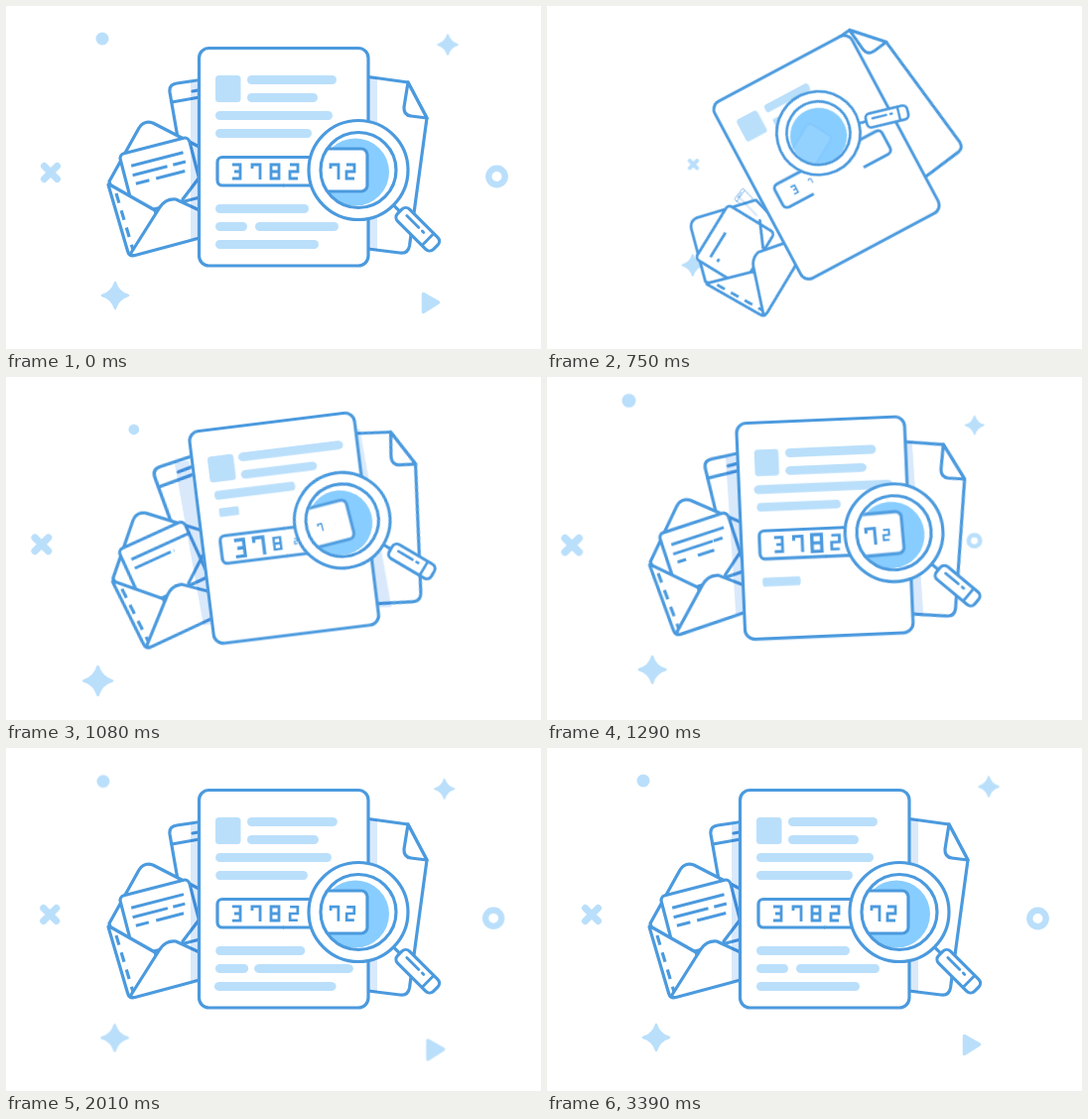
Write an HTML page without scripts that moves like this. It is 539x346 px and loops after 3.51 s.

```html
<!DOCTYPE html>
<html lang="en">
<head>
<meta charset="utf-8">
<title>Document search</title>
<style>
  @property --size { syntax: "<number>"; inherits: false; initial-value: 1; }

  html, body { margin: 0; width: 100%; height: 100%; overflow: hidden; background: #fff; }
  svg { display: block; width: 100%; height: 100%; }

  .line { fill: #fff; stroke: #4b9ade; stroke-width: 3.2; stroke-linejoin: round; stroke-linecap: round; }
  .open { fill: none; }
  .ink { fill: #4b9ade; }
  .pale { fill: #badffb; }
  .shade { fill: #d9e9fb; mix-blend-mode: multiply; }

  .spin, .side, .tab, .icon, .bar, .block, .digit, .early, .late, .field, .zoom {
    animation: 3.51s linear var(--d, 0s) infinite;
  }
  .spin { animation-name: spin; transform-origin: 282px 149px; }
  .lens { --d: .015s; transform-origin: 225px 258px; }
  .side { animation-name: side; }
  .page { --swing: 1.04; transform-origin: 279px 208px; }
  .envelope { --swing: .96; transform-origin: 214px 229px; }
  .tab { animation-name: tab; transform-origin: 200px 146px; }
  .icon { animation-name: grow; transform-origin: 282px 149px; }
  .bar { animation-name: stretch; transform: scaleX(var(--size)); transform-box: fill-box; transform-origin: 6% 50%; }
  .digit { animation-name: stretch; transform: scale(var(--size)); transform-origin: 0 0; fill: none; stroke: #4b9ade; stroke-width: 2.8; }
  .block { animation-name: block; transform-box: fill-box; transform-origin: center; }
  .zoom { animation-name: zoom; transform-origin: 345px 166px; }
  .field { animation-name: field; fill: none; stroke-linecap: butt; }

  /* Gates hide delayed parts until their own cycle has begun. */
  .early { animation-name: early; animation-timing-function: step-end; }
  .late { animation-name: late; animation-timing-function: step-end; }
  @keyframes early { 0%, 17.1%, 100% { visibility: visible } .85% { visibility: hidden } }
  @keyframes late { 0%, 32.7%, 100% { visibility: visible } .85% { visibility: hidden } }

  @keyframes spin {
    0% { transform: rotate(0deg) scale(1); animation-timing-function: step-end }
    .85% { transform: rotate(-360deg) scale(0); animation-timing-function: cubic-bezier(.35, .15, .7, .6) }
    14.53% { transform: rotate(-163deg) scale(.62); animation-timing-function: cubic-bezier(.3, .45, .6, .9) }
    21.37% { transform: rotate(-28.2deg) scale(.92); animation-timing-function: cubic-bezier(.25, .5, .6, .9) }
    30.77% { transform: rotate(-7.1deg) scale(.982); animation-timing-function: ease-out }
    43.5%, 100% { transform: rotate(0deg) scale(1) }
  }
  @keyframes side {
    0% { transform: rotate(0deg) scale(1); animation-timing-function: step-end }
    .85%, 14.53% { transform: rotate(-82deg) scale(0); animation-timing-function: ease-out }
    21.37% { transform: rotate(-16deg) scale(var(--swing)); animation-timing-function: ease-out }
    30.77% { transform: rotate(-3deg) scale(1.02) }
    44.4% { transform: rotate(.9deg) scale(1) }
    56%, 100% { transform: rotate(0deg) scale(1) }
  }
  @keyframes tab {
    0% { transform: scale(1); animation-timing-function: step-end }
    .85%, 20% { transform: scale(0) }
    21.37% { transform: scale(.2) }
    28% { transform: scale(1.08) }
    36%, 100% { transform: scale(1) }
  }
  @keyframes grow {
    0% { transform: scale(1); animation-timing-function: step-end }
    .85% { transform: scale(0); animation-timing-function: cubic-bezier(.4, .15, .7, .58) }
    14.53% { transform: scale(.435) }
    21.37% { transform: scale(.785) }
    26.5% { transform: scale(1.038) }
    29.49% { transform: scale(1.108) }
    31.62% { transform: scale(1.097) }
    35.9% { transform: scale(1.033) }
    40.17% { transform: scale(.984) }
    43.59% { transform: scale(.976) }
    48.72% { transform: scale(.995) }
    53.85% { transform: scale(1.005) }
    62%, 100% { transform: scale(1) }
  }
  @keyframes stretch {
    0% { --size: 1; animation-timing-function: step-end }
    .85%, 16.24% { --size: 0 }
    18.8% { --size: .31 }
    23.08% { --size: .8 }
    27.35% { --size: 1.18 }
    29.9% { --size: 1.22 }
    31.62% { --size: 1.19 }
    35.9% { --size: 1.04 }
    40.17% { --size: .957 }
    44.44% { --size: .955 }
    48.72% { --size: .99 }
    53% { --size: 1.014 }
    57.26% { --size: 1.01 }
    61.5%, 100% { --size: 1 }
  }
  @keyframes block {
    0% { transform: scaleX(1); animation-timing-function: step-end }
    .85%, 11.97% { transform: scaleX(0) }
    14.53% { transform: scaleX(.31) }
    21.37% { transform: scaleX(1) }
    25.6% { transform: scaleX(1.2) }
    31.6% { transform: scaleX(1.03) }
    38% { transform: scaleX(.95) }
    48.7%, 100% { transform: scaleX(1) }
  }
  @keyframes field {
    0% { stroke-dasharray: 0 0 101 0; animation-timing-function: step-end }
    .85%, 11.5% { stroke-dasharray: 0 50 0 50 }
    14.53% { stroke-dasharray: 0 34.5 31 34.5 }
    21.37% { stroke-dasharray: 0 20 60 20 }
    29%, 100% { stroke-dasharray: 0 0 101 0 }
  }
  @keyframes zoom {
    0% { opacity: 1; transform: scale(1); animation-timing-function: step-end }
    .85%, 17% { opacity: 0; transform: scale(.5) }
    21.37% { opacity: .1; transform: scale(.8) }
    29%, 100% { opacity: 1; transform: scale(1) }
    30.77% { opacity: 1; transform: scale(.97) }
    38% { opacity: 1; transform: scale(1) }
  }
</style>
</head>
<body>
<svg viewBox="0 0 539 346" role="img" aria-label="Document with the number 378272 under a magnifying glass">
  <defs>
    <path id="star" d="M0-13Q3-3 13 0Q3 3 0 13Q-3 3-13 0Q-3-3 0-13Z" stroke="#badffb" stroke-width="2.5" stroke-linejoin="round"/>
    <path id="two" d="M-4-7H4V0H-4V7H4"/>
    <path id="three" d="M-4-7H4V7H-4M-2 0H4"/>
    <path id="seven" d="M-4-3V-7H4V8"/>
    <path id="eight" d="M-4-7H4V7H-4ZM-4 0H4"/>
    <path id="bracket" pathLength="100" d="M280 152.5H218a5 5 0 0 0-5 5V176a5 5 0 0 0 5 5H280"/>
    <clipPath id="glass"><circle cx="355" cy="165.5" r="37"/></clipPath>
  </defs>

  <g class="pale">
    <g class="icon"><use href="#star" transform="translate(110 292)"/></g>
    <g class="early">
      <path class="icon" style="--d:.15s" d="M38.5 161.5l13 13m0-13l-13 13" stroke="#badffb" stroke-width="7" stroke-linecap="round"/>
      <circle class="icon" style="--d:.3s" cx="97" cy="33" r="6.5"/>
      <g class="icon" style="--d:.45s"><use href="#star" transform="translate(445 39) scale(.76)"/></g>
    </g>
    <g class="late">
      <circle class="icon" style="--d:.6s" cx="494.5" cy="172" r="8.2" fill="none" stroke="#badffb" stroke-width="6.4"/>
      <path class="icon" style="--d:.75s" d="M420.5 290.5L435.5 299L420.5 308.5Z" stroke="#badffb" stroke-width="3.5" stroke-linejoin="round"/>
    </g>
  </g>

  <g class="spin">
    <!-- back page -->
    <g class="side page">
      <path class="line" d="M340 68L405 77L424 113L406.5 242Q405 250 397 249L340 242Z"/>
      <path class="line" d="M405 77L401 102Q400.5 110 408 111L424 113Z"/>
      <path class="shade tab" style="transform-origin:355px 160px" d="M360 71L374 73V246L360 244Z"/>
    </g>

    <!-- window and envelope -->
    <g class="side envelope">
      <g class="tab">
        <path class="line" d="M240 68L172 78Q164 79 165 87L176 150H240Z"/>
        <path class="line open" d="M167 97L240 84M188 86L220 80"/>
      </g>
      <path class="line" d="M104 177L134 123Q139 115 148 118L210 150V230L130 248Z"/>
      <g transform="translate(114 150) rotate(-14.5)">
        <rect class="line" width="72" height="62" rx="5"/>
        <g class="ink">
          <rect class="bar" x="9" y="12.5" width="54" height="3"/>
          <g class="early">
            <rect class="bar" style="--d:.15s" x="8" y="22" width="36" height="3"/>
            <rect class="bar" style="--d:.5s" x="50" y="22" width="13" height="3"/>
            <rect class="bar" style="--d:.53s" x="9" y="31" width="14" height="3"/>
            <rect class="bar" style="--d:.55s" x="30" y="31" width="30" height="3"/>
          </g>
        </g>
      </g>
      <path class="line open" d="M197 170L178 195"/>
      <path class="line" d="M103.5 182Q102 178 106 181L150 206L158 230L129 251.5Q124 253 122.500 247Z"/>
      <path class="line open" d="M111 189L128 246" style="stroke-dasharray:10 8;stroke-linecap:butt"/>
      <path class="line" d="M126 249L155 203Q161 194 171 195L210 213V230L130 251.5Q125 252 126 249Z"/>
      <path class="shade tab" d="M186 77H200V235H186Z"/>
    </g>

    <!-- front document -->
    <rect class="line" x="194.5" y="42.5" width="170.5" height="219.5" rx="10"/>
    <g class="pale">
      <rect class="block" x="211" y="70" width="25.5" height="27" rx="3.5"/>
      <rect class="bar" x="243" y="70" width="90" height="9" rx="4.5"/>
      <g class="early">
        <rect class="bar" style="--d:.15s" x="243" y="88" width="71" height="9" rx="4.5"/>
        <rect class="bar" style="--d:.3s" x="211" y="106" width="118" height="9" rx="4.5"/>
        <rect class="bar" style="--d:.45s" x="211" y="124" width="97" height="9" rx="4.5"/>
      </g>
      <g class="late">
        <rect class="bar" style="--d:.6s" x="211" y="200" width="94" height="9" rx="4.5"/>
        <rect class="bar" style="--d:.75s" x="211" y="218" width="32" height="9" rx="4.5"/>
        <rect class="bar" style="--d:.9s" x="251" y="218" width="84" height="9" rx="4.5"/>
        <rect class="bar" style="--d:1.05s" x="211" y="236" width="104" height="9" rx="4.5"/>
      </g>
    </g>
    <use class="line field" href="#bracket"/>
    <use class="line field" href="#bracket" transform="translate(559 0) scale(-1 1)"/>
    <g transform="translate(232 167)"><use class="digit" href="#three"/></g>
    <g class="early">
      <g transform="translate(252 167)"><use class="digit" style="--d:.07s" href="#seven"/></g>
      <g transform="translate(271 167)"><use class="digit" style="--d:.25s" href="#eight"/></g>
      <g transform="translate(290 167)"><use class="digit" style="--d:.4s" href="#two"/></g>
    </g>

    <!-- magnifying glass -->
    <g class="spin lens">
      <g class="line" transform="translate(355 165.5) rotate(45)">
        <path d="M50 0H59"/>
        <rect x="59" y="-8.5" width="51" height="17" rx="5.5"/>
        <path d="M99-8V8M67-2H84M89-2H91" stroke-width="2.8"/>
      </g>
      <circle class="line" cx="355" cy="165.5" r="50"/>
      <circle cx="355" cy="165.5" r="38" fill="#fff"/>
      <g clip-path="url(#glass)">
        <circle cx="352" cy="167.5" r="34" fill="#88cdff"/>
        <rect class="line zoom" x="300" y="144" width="64" height="43" rx="6"/>
        <g class="early">
          <g transform="translate(331 167)"><use class="digit" style="--d:.36s" href="#seven"/></g>
          <g transform="translate(347 167)"><use class="digit" style="--d:.5s" href="#two"/></g>
        </g>
      </g>
      <circle class="line open" cx="355" cy="165.5" r="38"/>
    </g>
  </g>
</svg>
</body>
</html>
```
